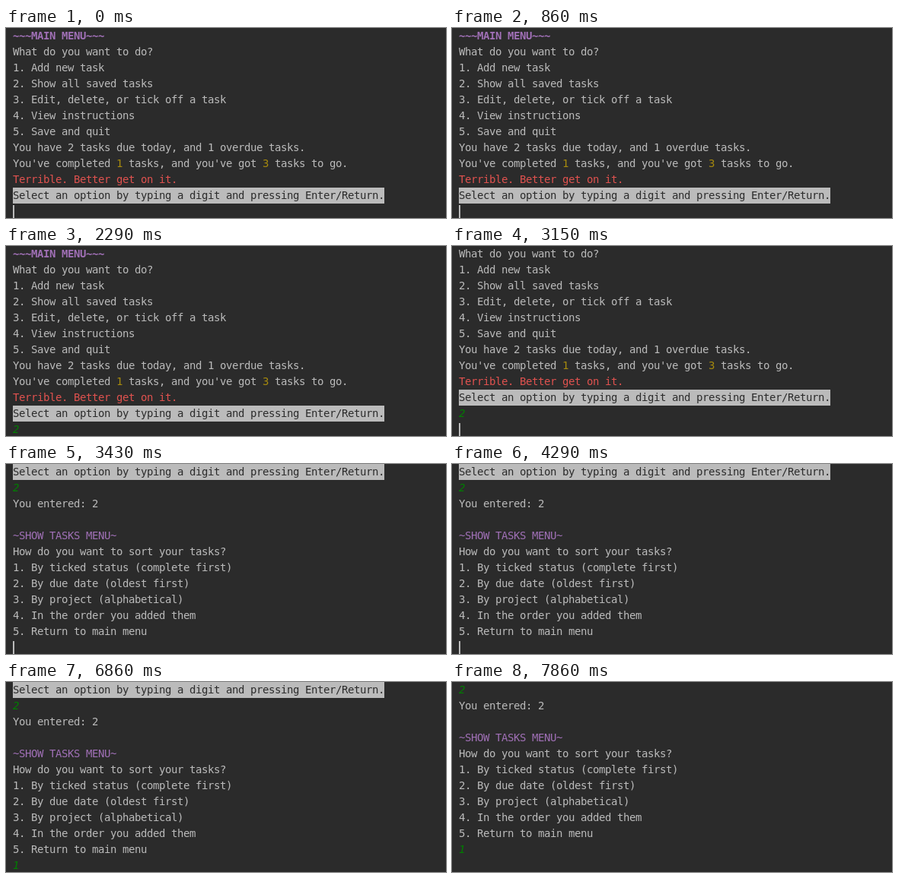
Animation of 578 by 250 pixels, one loop 8 s. Source, as an HTML page:

```html
<!DOCTYPE html>
<html lang="en">
<head>
<meta charset="utf-8">
<title>Task console</title>
<style>
  html, body { margin: 0; width: 100%; height: 100%; overflow: hidden; background: #2b2b2b; }
  svg { display: block; width: 578px; height: 250px; }
  /* Letter spacing keeps the 8px console grid. */
  text {
    font: 14px "DejaVu Sans Mono", "Noto Sans Mono", monospace;
    letter-spacing: calc(8px - 0.602em);
    fill: #bbb;
    white-space: pre;
  }
  .title { fill: #a070b6; }
  .bold { font-weight: 700; }
  .num { fill: #a68a0d; }
  .warn { fill: #e0524f; }
  .mark { fill: #2b2b2b; }
  .input { fill: #007f00; font-style: italic; }
</style>
</head>
<body>
<svg viewBox="0 0 578 250">
  <rect width="578" height="250" fill="#2b2b2b"/>
  <g id="log"></g>
  <rect id="caret" width="2" height="18" fill="#bbb"/>
</svg>
<script>
const LOOP = 8000, ROW = 21, COL = 8, LEFT = 9, BLINK = 500;

// Each line: text, class. Digits between braces are highlighted.
const lines = [
  ["~~~MAIN MENU~~~", "title bold"],
  ["What do you want to do?"],
  ["1. Add new task"],
  ["2. Show all saved tasks"],
  ["3. Edit, delete, or tick off a task"],
  ["4. View instructions"],
  ["5. Save and quit"],
  ["You have 2 tasks due today, and 1 overdue tasks."],
  ["You've completed {1} tasks, and you've got {3} tasks to go."],
  ["Terrible. Better get on it.", "warn"],
  ["Select an option by typing a digit and pressing Enter/Return.", "mark"],
  ["2", "input"],
  ["You entered: 2"],
  [""],
  ["~SHOW TASKS MENU~", "title"],
  ["How do you want to sort your tasks?"],
  ["1. By ticked status (complete first)"],
  ["2. By due date (oldest first)"],
  ["3. By project (alphabetical)"],
  ["4. In the order you added them"],
  ["5. Return to main menu"],
  ["1", "input"]
];

// Console states: start time, first line shown, lines printed, caret row and column.
const states = [
  { at: 0,    top: 0,  count: 11, row: 11, col: 0 },
  { at: 1425, top: 0,  count: 12, row: 11, col: 1 },
  { at: 3143, top: 1,  count: 12, row: 11, col: 0 },
  { at: 3425, top: 10, count: 21, row: 11, col: 0 },
  { at: 6143, top: 10, count: 22, row: 11, col: 1 },
  { at: 7715, top: 11, count: 22, row: 11, col: 0 }
];

// Keystrokes restart the caret's blink cycle.
const blinkStarts = [-215, 1425, 3143];

const log = document.getElementById("log");
const caret = document.getElementById("caret");

function add(parent, tag, attrs) {
  const el = document.createElementNS("http://www.w3.org/2000/svg", tag);
  for (const key in attrs) el.setAttribute(key, attrs[key]);
  return parent.appendChild(el);
}

const nodes = lines.map(([str, cls = ""], i) => {
  const g = add(log, "g", {});
  if (cls === "mark") {
    add(g, "rect", { x: LEFT, y: i * ROW, width: str.length * COL, height: ROW, fill: "#bbb" });
  }
  const text = add(g, "text", { x: LEFT, y: i * ROW + 15, class: cls });
  str.split(/[{}]/).forEach((part, k) => {
    add(text, "tspan", k % 2 ? { class: "num" } : {}).textContent = part;
  });
  return g;
});

function draw(t) {
  const s = states.findLast(state => state.at <= t);
  const start = blinkStarts.findLast(b => b <= t);
  log.setAttribute("transform", `translate(0 ${-s.top * ROW})`);
  nodes.forEach((g, i) => {
    g.setAttribute("visibility", i >= s.top && i < s.count ? "visible" : "hidden");
  });
  caret.setAttribute("x", LEFT + s.col * COL);
  caret.setAttribute("y", s.row * ROW + 2);
  caret.setAttribute("visibility", Math.floor((t - start) / BLINK) % 2 ? "hidden" : "visible");
}

const begin = performance.now();
function tick() {
  draw((performance.now() - begin) % LOOP);
  requestAnimationFrame(tick);
}
tick();
</script>
</body>
</html>
```
